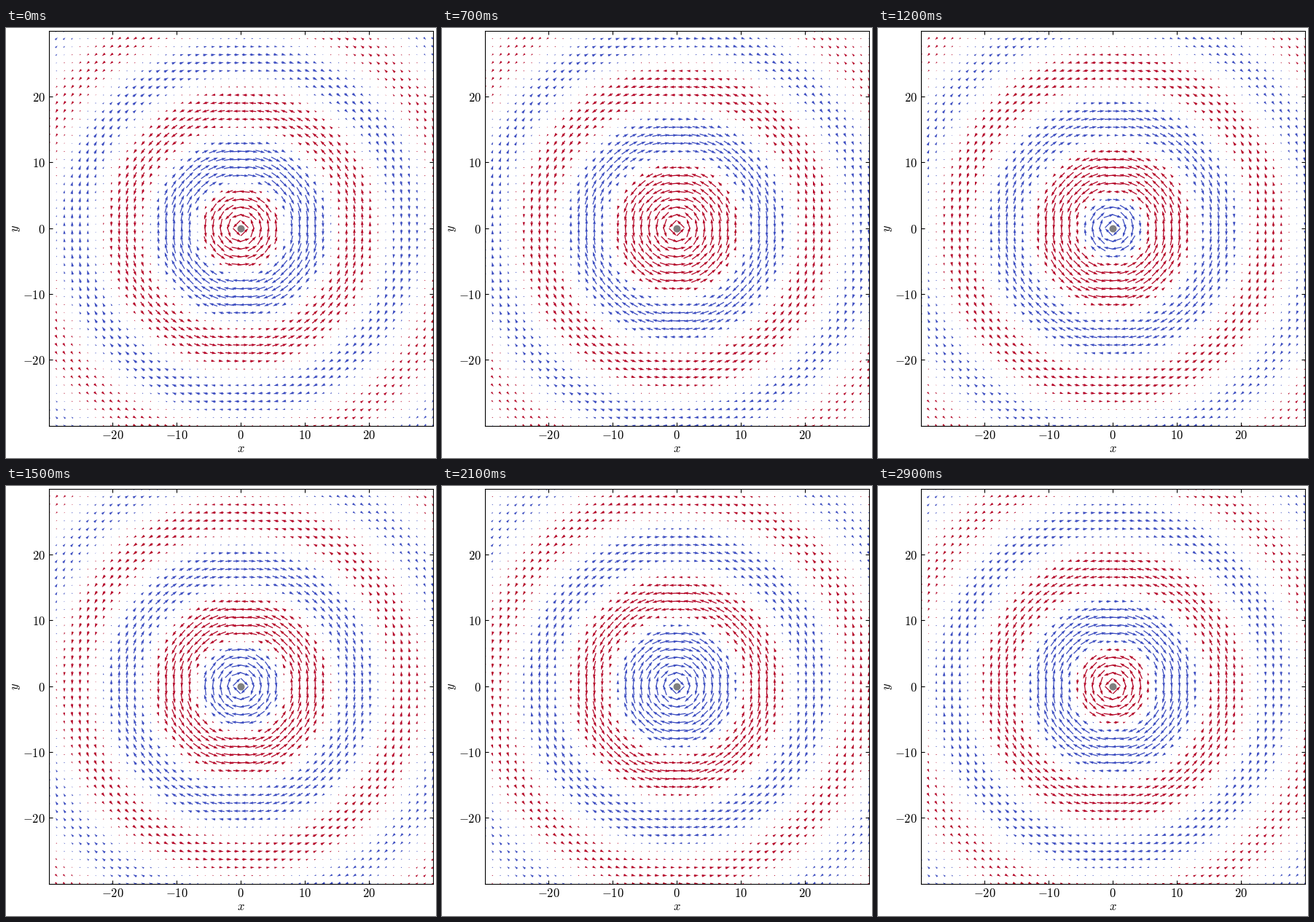
A matplotlib script for the animation above (3000 ms loop, 590x590 px).

```python
import numpy as np
import matplotlib.pyplot as plt
from matplotlib.animation import FuncAnimation

SIZE, DPI = 590, 100
LEFT, TOP, WIDTH, HEIGHT = 58.5, 3.5, 527, 542   # plot box in pixels
FRAMES, INTERVAL = 30, 100
HALF = 30                # half width of the plotted square
POINTS = 50              # arrows per side
WAVE_NUMBER = 2 * np.pi / 15
MAX_FIELD = 0.077        # the near field is cut off here

plt.rcParams["mathtext.fontset"] = "cm"


def px(pixels):
    """Pixels to typographic points."""
    return pixels * 72 / DPI


def label(x, y, text, **kwargs):
    """Text centred on a stage position given in pixels from the top left."""
    fig.text(x / SIZE, 1 - y / SIZE, text, size=12, ha="center", va="center",
             **kwargs)


axis = np.linspace(-HALF, HALF, POINTS)
X, Y = np.meshgrid(axis, axis)
R = np.hypot(X, Y)
KR = WAVE_NUMBER * R


def azimuthal(frame):
    """Azimuthal magnetic field of an oscillating dipole."""
    phase = KR - 2 * np.pi * frame / FRAMES
    b = (np.sin(phase) + np.cos(phase) / KR) / R
    return np.clip(b, -MAX_FIELD, MAX_FIELD)


def field(frame):
    """Arrow components and the sign that picks the colour."""
    b = azimuthal(frame)
    return -b * Y / R, b * X / R, np.sign(b)


fig = plt.figure(figsize=(SIZE / DPI, SIZE / DPI), dpi=DPI, facecolor="white")
ax = fig.add_axes([LEFT / SIZE, 1 - (TOP + HEIGHT) / SIZE,
                   WIDTH / SIZE, HEIGHT / SIZE])
ax.set_xlim(-HALF, HALF)
ax.set_ylim(-HALF, HALF)

ticks = range(-20, 21, 10)
names = [f"${t}$" for t in ticks]
ax.set_xticks(ticks, names)
ax.set_yticks(ticks, names)
ax.tick_params(direction="in", top=True, right=True, labelsize=12)
label(LEFT + WIDTH / 2, 577.5, "$x$")
label(13, TOP + HEIGHT / 2, "$y$", rotation=90)

# One scale for the whole loop, from the mean field at the start.
scale = 1.8 * np.abs(azimuthal(0)).mean() * POINTS / WIDTH
arrows = ax.quiver(X, Y, *field(0), cmap="coolwarm", clim=(-1, 1), pivot="mid",
                   units="dots", width=0.0024 * WIDTH,
                   scale_units="dots", scale=scale)
ax.plot(0, 0, "o", color="gray", markersize=px(10), markeredgewidth=0, zorder=5)


def update(frame):
    arrows.set_UVC(*field(frame))
    return [arrows]


anim = FuncAnimation(fig, update, frames=FRAMES, interval=INTERVAL,
                     repeat=True, repeat_delay=0, blit=False)
plt.show()
```
